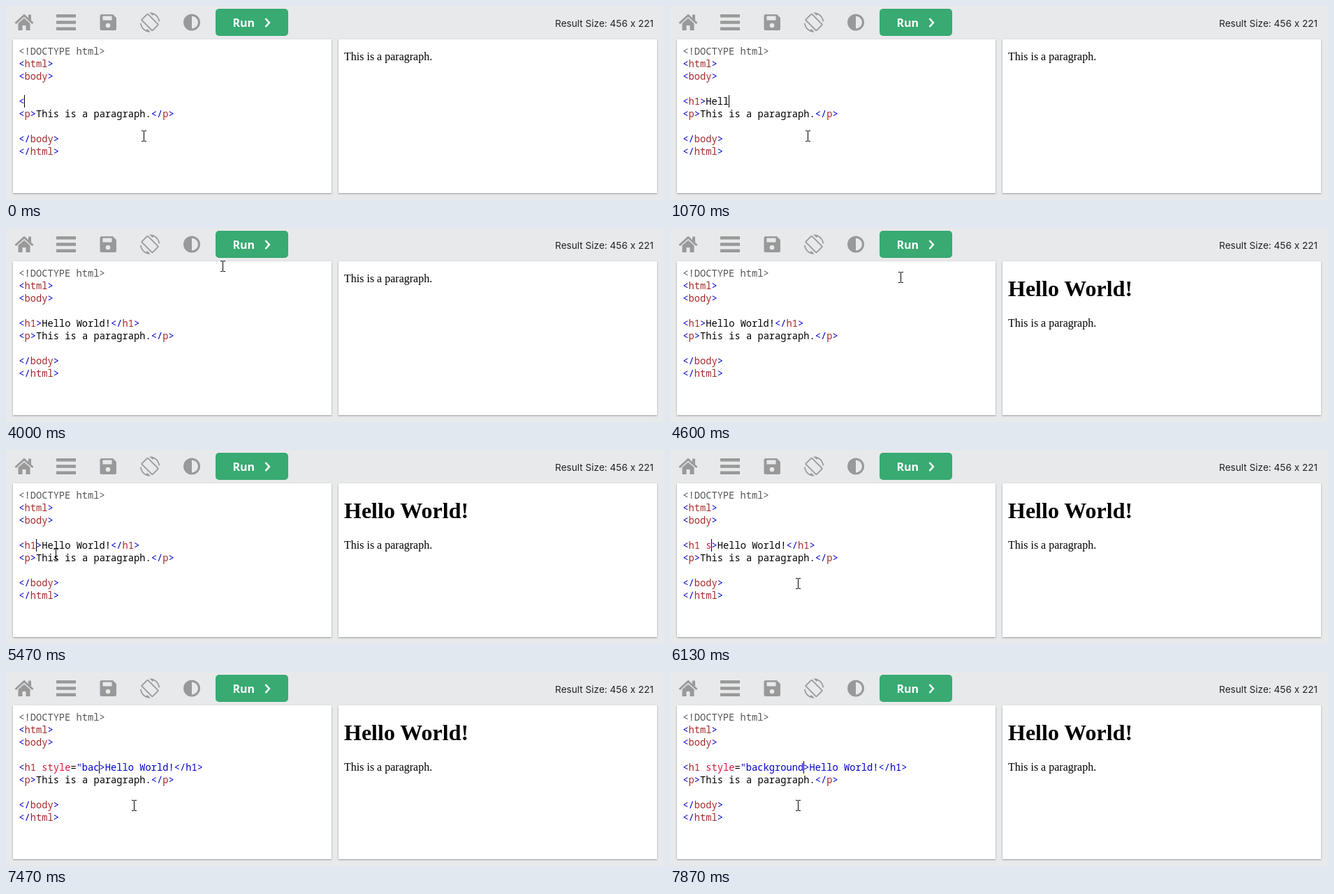
Recreate the animation shown at these times as an HTML page. Size 942x279 px, loop 8 s.

```html
<!DOCTYPE html>
<html lang="en">
<head>
<meta charset="utf-8">
<title>HTML editor</title>
<style>
  html, body { margin: 0; width: 100%; height: 100%; overflow: hidden; background: #e7e9eb; }
  svg { position: absolute; left: 0; top: 0; display: block; }
  .panel { position: absolute; top: 48px; width: 456px; height: 221px; background: #fff;
    box-shadow: 0 1px 3px rgba(0,0,0,.12), 0 1px 2px rgba(0,0,0,.24); }
  text { white-space: pre; }
  .code { font: 13.745px "Noto Sans Mono", monospace; }
  .page { font: 16px "Liberation Serif", serif; }
  .page .h1 { font-size: 32px; font-weight: bold; }
  .size { font: 13.6px Inter, sans-serif; fill: #222; text-anchor: end; }
  .run { font: bold 16px "Noto Sans", sans-serif; fill: #fff; }
  #btn { fill: #38aa72; }
  #btn.hover { fill: #1f9c68; }
  .icons { fill: #999; }
  .cut { fill: #e7e9eb; }
  .line { fill: none; stroke: #999; stroke-width: 3; }
  .bracket { fill: #0000cd; }
  .tag { fill: #a52a2a; }
  .attr { fill: #dc143c; }
  .string { fill: #0000cd; }
  .meta { fill: #555; }
  .error { fill: #f00; }
</style>
</head>
<body>
<div class="panel" style="left:10px"></div>
<div class="panel" style="left:476px"></div>
<svg width="942" height="279" viewBox="0 0 942 279">
  <g class="icons">
    <path class="line" d="M13.5 25L26 13.5 38.5 25"/>
    <path d="M17.5 25L26 17.5 34.5 25V35H28.5V28H23.5V35H17.5ZM32 12.5H36V21L32 17.5Z"/>
    <path d="M72 12h28v4.6H72zM72 21.2h28v4.6H72zM72 30.4h28v4.6H72z"/>
    <path d="M137 12H153L158 17V32.5Q158 35 155.500 35H137Q134.500 35 134.500 32.500V14.500Q134.500 12 137 12Z"/>
    <path class="cut" d="M138.500 14.500h13v6h-13z"/>
    <circle class="cut" cx="146" cy="28" r="3.3"/>
    <path transform="translate(191.900 9.300) scale(1.18)" d="M16.480 2.520c3.270 1.550 5.610 4.720 5.970 8.480h1.500C23.440 4.840 18.290 0 12 0l-.66.03 3.810 3.810zM10.230 1.750c-.59-.59-1.540-.59-2.120 0L1.750 8.110c-.59.59-.59 1.540 0 2.120l12.020 12.020c.59.59 1.540.59 2.120 0l6.360-6.360c.59-.59.59-1.540 0-2.120zm4.600 19.440L2.810 9.170l6.360-6.360 12.020 12.020zM7.520 21.480C4.250 19.940 1.910 16.760 1.550 13H.05C.56 19.160 5.710 24 12 24l.66-.03-3.810-3.810z"/>
    <circle class="line" cx="266" cy="23.500" r="10.500"/>
    <path d="M266 13a10.500 10.500 0 0 0 0 21z"/>
  </g>
  <rect id="btn" x="300" y="4" width="104" height="39" rx="5"/>
  <text class="run" x="324.500" y="30">Run</text>
  <path d="M371.500 18L376.800 24 371.500 30" fill="none" stroke="#fff" stroke-width="2.600"/>
  <text class="size" x="927" y="29.500">Result Size: 456 x 221</text>
  <g class="code" id="code"></g>
  <g class="page">
    <text class="h1" id="title" x="484" y="98">Hello World!</text>
    <text id="para" x="484">This is a paragraph.</text>
  </g>
  <rect id="caret" y="128" width="1" height="18"/>
  <g id="mouse">
    <path id="beam" d="M-3 -7.500H0M1 -7.500H4M.500 -7V7M-3 7.500H0M1 7.500H4" fill="none" stroke="#000"/>
    <path id="hand" fill="#fff" stroke="#000" stroke-linejoin="round"
      d="M-1.500 1Q0 -1 1.500 1V7Q3 5.500 4.500 7.500Q6 6.500 7.500 8.500Q9 7.500 10.500 9.500V14L8.500 20H-1.500L-6.500 12.500Q-7 10 -4.500 10.500L-1.500 13Z"/>
  </g>
</svg>
<script>
const $ = id => document.getElementById(id);
const TICK = 1000 / 15, LOOP = 8000, CHAR = 8.247, LEFT = 18.2;
const RUN = 65, CLICK = 79;

// [tick, typed characters]
const heading = [[1, 'h'], [4, '1'], [7, '>'], [10, 'H'], [12, 'e'], [13, 'l'], [16, 'l'],
  [17, 'o'], [19, ' W'], [22, 'o'], [23, 'r'], [24, 'l'], [30, 'd'], [34, '!'], [38, '<'],
  [42, '/'], [45, 'h'], [46, '1'], [49, '>']];
const attribute = [[89, ' '], [92, 's'], [94, 't'], [96, 'y'], [100, 'l'], [101, 'e'],
  [103, '='], [105, '"'], [108, 'b'], [110, 'a'], [112, 'c'], [114, 'kg'], [115, 'r'],
  [116, 'o'], [117, 'un'], [118, 'd']];

// [tick, x, y]
const path = [[0, 197, 187], [56, 197, 187], [60, 310, 55], [62, 341, 27], [67, 341, 27],
  [69, 330, 71], [79, 43, 139], [81, 43, 139], [86, 183, 192], [120, 183, 192]];

const typed = (keys, tick) => keys.filter(k => k[0] <= tick).map(k => k[1]).join('');

function tokens(line) {
  let mode = 'text', last = '';
  return line.match(/<!.*?>|<\/?|>|"[^"]*|[\w.!]+|=|\s+/g)?.map(part => {
    let style = '';
    if (part.startsWith('<!')) style = 'meta';
    else if (part[0] === '<') { style = 'bracket'; mode = 'tag'; }
    else if (part === '>') { style = last === '=' ? 'error' : 'bracket'; mode = 'text'; }
    else if (part[0] === '"') style = 'string';
    else if (mode !== 'text' && /\w/.test(part)) { style = mode; mode = 'attr'; }
    last = part;
    return [style, part];
  }) ?? [];
}

const svg = (name, parent, attrs) => {
  const el = document.createElementNS('http://www.w3.org/2000/svg', name);
  for (const key in attrs) el.setAttribute(key, attrs[key]);
  return parent.appendChild(el);
};

function paint(el, line) {
  el.textContent = '';
  for (const [style, part] of tokens(line))
    svg('tspan', el, { class: style }).textContent = part;
}

const rows = ['<!DOCTYPE html>', '<html>', '<body>', '', '', '<p>This is a paragraph.</p>',
  '', '</body>', '</html>'].map((line, i) => {
  const el = svg('text', $('code'), { x: LEFT, y: 70 + 18 * i });
  paint(el, line);
  return el;
});

function mouseAt(tick) {
  const i = path.findIndex(p => p[0] > tick);
  const [t0, x0, y0] = path[i - 1], [t1, x1, y1] = path[i];
  const k = (tick - t0) / (t1 - t0);
  return [x0 + (x1 - x0) * k, y0 + (y1 - y0) * k].map(Math.round);
}

const show = (id, on) => $(id).setAttribute('visibility', on ? 'visible' : 'hidden');

function draw(tick) {
  const editing = tick >= CLICK;
  const head = editing ? '<h1' + typed(attribute, tick) : '<' + typed(heading, tick);
  paint(rows[4], head + (editing ? '>Hello World!</h1>' : ''));
  $('caret').setAttribute('x', Math.round(LEFT + head.length * CHAR - .2));
  show('caret', tick < 57 || editing && tick < 87 || tick >= 89);

  show('title', tick >= RUN);
  $('para').setAttribute('y', tick >= RUN ? 142 : 78);

  const [x, y] = mouseAt(tick);
  const over = y < 43;
  $('mouse').setAttribute('transform', `translate(${x} ${y})`);
  $('btn').classList.toggle('hover', over);
  show('hand', over);
  show('beam', !over);
}

let start, shown = -1;
function loop(now) {
  start ??= now;
  const tick = Math.floor((now - start) % LOOP / TICK + .1) % 120;
  if (tick !== shown) draw(shown = tick);
  requestAnimationFrame(loop);
}
draw(0);
requestAnimationFrame(loop);
</script>
</body>
</html>
```
